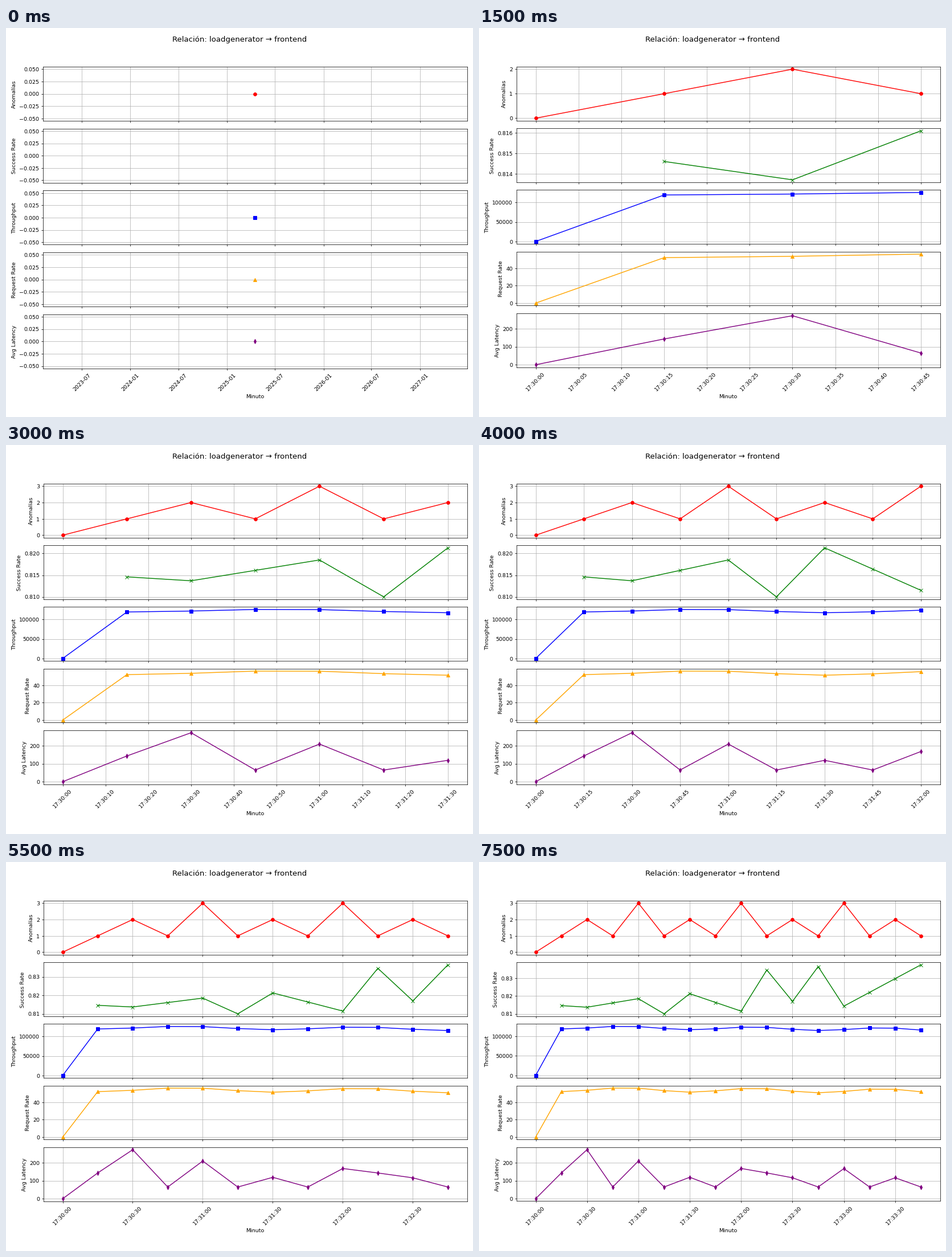
Animation of 820 by 683 pixels, one loop 8 s. Source, as a matplotlib script:

```python
import numpy as np
import matplotlib.pyplot as plt
from matplotlib.animation import FuncAnimation

STEPS = 16
INTERVAL = 500

n = np.arange(STEPS)
running = n > 0
times = np.datetime64("2025-04-16T17:30:00") + n * np.timedelta64(15, "s")

# Anomalies cycle 1, 2, 1, 3 once traffic starts
anomalies = running * np.where(n % 2, 1, np.where(n % 4, 2, 3))

# Traffic swings with a period of five samples and slowly declines
swing = np.cos(2 * np.pi * (n - 3.5) / 5)
throughput = running * (123500 - 400 * n + 4000 * swing)
requests = running * (54.8 - 0.13 * n + 2.4 * swing)

# Latency follows the anomalies, with a start-up spike and a periodic bump
spike = 156 * (anomalies - 1) * np.exp(2.0 - n)
latency = running * (14 + 51 * anomalies + spike + 78 * (n % 8 == 1))

# Success rate: straight runs between its turning points
turns = [1, 2, 4, 5, 6, 8, 9, 10, 11, 12, 15]
rates = [.8146, .8137, .8185, .81, .8213, .8115, .8346, .817, .8365, .8143, .8375]
success = np.interp(n, turns, rates, left=np.nan)

SERIES = [
    ("Anomalías", "red", "o", anomalies),
    ("Success Rate", "green", "x", success),
    ("Throughput", "blue", "s", throughput),
    ("Request Rate", "orange", "^", requests),
    ("Avg Latency", "purple", "d", latency),
]

fig, axes = plt.subplots(len(SERIES), 1, figsize=(12, 10), dpi=820 / 12, sharex=True)
fig.suptitle("Relación: loadgenerator → frontend", fontsize=14)

lines = []
for ax, (label, color, marker, values) in zip(axes, SERIES):
    line, = ax.plot(times, values, color=color, marker=marker)
    lines.append(line)
    ax.set_ylabel(label)
    ax.grid(True)
axes[-1].set_xlabel("Minuto")
axes[-1].tick_params(axis="x", rotation=45)


def update(step):
    count = step + 1
    for ax, line, (*_, values) in zip(axes, lines, SERIES):
        line.set_data(times[:count], values[:count])
        ax.relim()
        ax.set_ylim(0, 1, auto=True)  # forget old limits when there is no data
    for ax in axes:
        ax.autoscale_view()
    fig.tight_layout(rect=[0, 0.031, 1, 0.949])
    return lines


anim = FuncAnimation(fig, update, frames=STEPS, interval=INTERVAL,
                     repeat=True, repeat_delay=0, blit=False)
plt.show()
```
